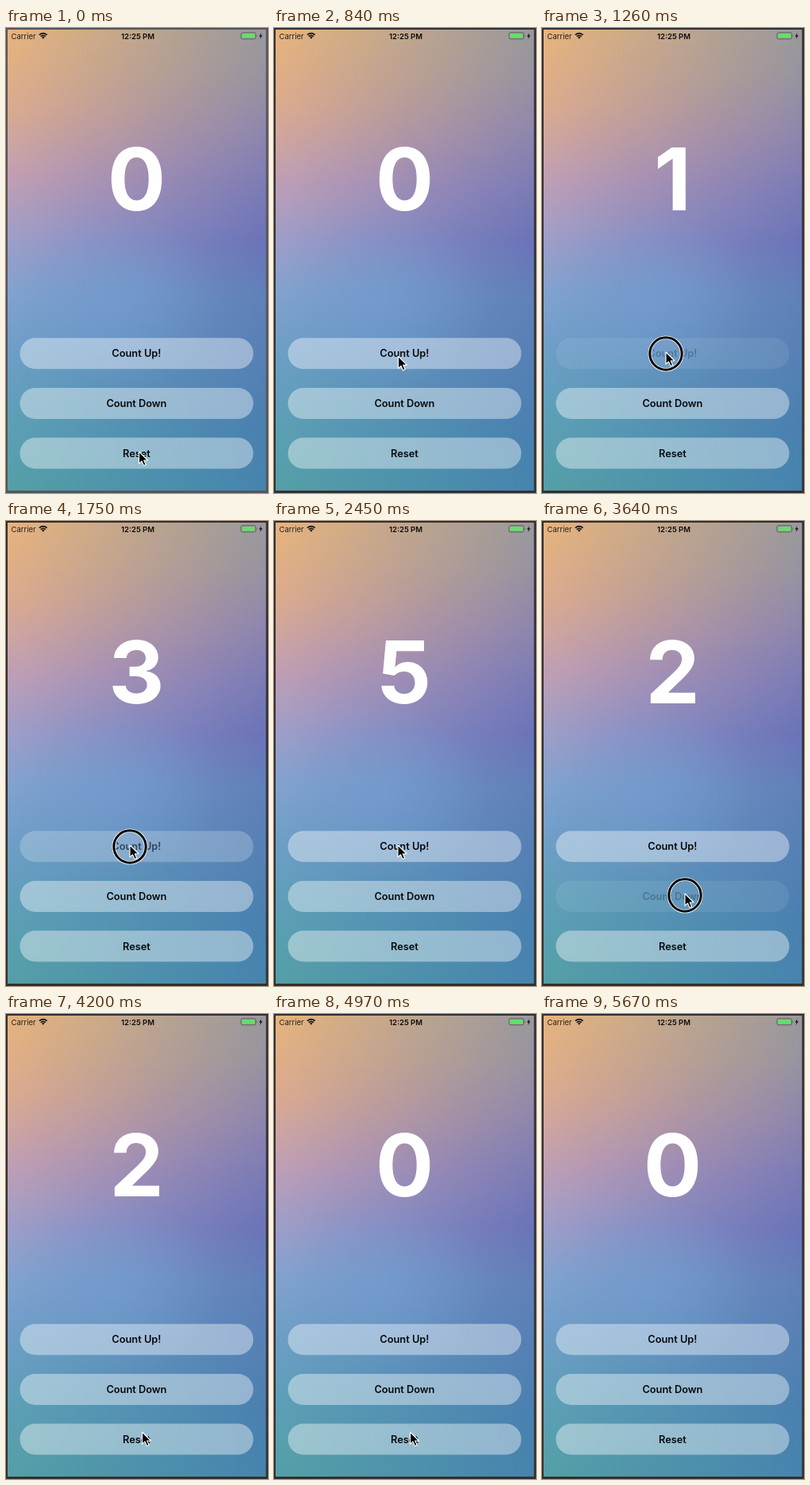
An HTML page that plays this animation: 330 px wide and 584 px high, repeating every 5.74 s.

```html
<!DOCTYPE html>
<html lang="en">
<head>
<meta charset="utf-8">
<title>Counter</title>
<style>
  html, body { margin: 0; width: 100%; height: 100%; overflow: hidden; background: #332f33; }
  #stage { position: relative; width: 330px; height: 584px; overflow: hidden; }
  #screen { position: absolute; left: 2px; top: 2px; width: 325.5px; height: 579px; }
  .layer { position: absolute; inset: 0; }
  .left {
    background: linear-gradient(#e8b47c, #dcab8f 17%, #c09fb5 33%, #a09fc8 45%,
      #82a3cf 57%, #6f9fc8 69%, #5fa0b8 83%, #54a0a6);
  }
  .right {
    background: linear-gradient(#99989c, #9693a0 10%, #8e86ad 22%, #7b7bb5 34%,
      #6a73b8 46%, #6080b8 58%, #5580b4 72%, #4a80b0 86%, #4684ae);
    -webkit-mask-image: linear-gradient(90deg, transparent, #000);
    mask-image: linear-gradient(90deg, transparent, #000);
  }
  .glow { background: radial-gradient(130px 110px at 42% 59%, rgba(116,162,212,.45), rgba(116,162,212,0)); }
  svg { position: absolute; left: 0; top: 0; }
  text { font-family: Inter, "Open Sans", sans-serif; }
  .button text { font-size: 12.8px; font-weight: 600; text-anchor: middle; fill: #080a0c; }
  .button rect { fill: #fff; fill-opacity: .4; }
  #count { font-size: 109px; font-weight: 700; text-anchor: middle; fill: #fff; }
  .status { font-size: 9.5px; fill: #25211f; }
</style>
</head>
<body>
<div id="stage">
  <div id="screen">
    <div class="layer left"></div>
    <div class="layer right"></div>
    <div class="layer glow"></div>
  </div>
  <svg width="330" height="584" viewBox="0 0 330 584">
    <text class="status" x="6.5" y="13.5">Carrier</text>
    <g fill="none" stroke="#151515" stroke-width="1.7">
      <path d="M41.9 8.7Q46.8 4.5 51.7 8.7M43.7 10.7Q46.8 8 49.9 10.7"/>
      <path d="M46.8 13.7L45 11.8Q46.8 10.3 48.6 11.8Z" fill="#151515" stroke="none"/>
    </g>
    <text class="status" x="166" y="13.5" text-anchor="middle" font-weight="600" style="fill:#0c0c0c">12:25 PM</text>
    <rect x="296" y="5.8" width="18.6" height="8" rx="2" fill="none" stroke="#4c5450" stroke-width=".8"/>
    <rect x="297.2" y="7" width="16.2" height="5.6" rx="1" fill="#67dc6c"/>
    <path d="M315.6 8.4q1.4 1.4 0 2.8z" fill="#4c5450"/>
    <path d="M321.8 6l-3.2 4.4h2l-.9 3.6 3.4-4.7h-2.1z" fill="#151515"/>
    <text id="count" x="164.5" y="229">0</text>
    <g id="buttons"></g>
    <g id="ring" fill="none">
      <circle r="20.2" stroke="#fff" stroke-width="4.6"/>
      <circle r="20.2" stroke="#000" stroke-width="3"/>
    </g>
    <path id="cursor" d="M0 0V15.2L3.5 12L6 17.6L8.7 16.4L6.2 11H11Z"
      fill="#000" stroke="#fff" stroke-width="1.1" stroke-linejoin="round"/>
    <path id="frame" fill-rule="evenodd" d="M0 0H330V584H0ZM2 2V581H327.5V2Z"/>
  </svg>
</div>
<script>
const LOOP = 5740, STEP = 70, FADE = 160, LINGER = 100, DIM = 0.2;
const $ = id => document.getElementById(id);

// press time, release time, button, count after release
const taps = [
  [1120, 1260, 0, 1], [1400, 1470, 0, 2], [1610, 1680, 0, 3],
  [1890, 1960, 0, 4], [2100, 2170, 0, 5],
  [2940, 3150, 1, 4], [3360, 3430, 1, 3], [3570, 3640, 1, 2],
  [4480, 4620, 2, 0]
];

// start time, end time, target x, y
const home = [167.5, 532];
const moves = [
  [350, 910, 156, 407],
  [2450, 2870, 180, 468],
  [3710, 4130, 171.5, 525],
  [5040, 5600, 245, 590]
];

const buttons = ["Count Up!", "Count Down", "Reset"].map((label, i) => {
  const y = 389.3 + i * 62.6;
  $("buttons").insertAdjacentHTML("beforeend",
    `<g class="button"><rect x="17.5" y="${y}" width="294" height="39" rx="19.5"/>
     <text x="164.4" y="${y + 24}">${label}</text></g>`);
  return $("buttons").lastElementChild;
});

const ease = p => p * p * (3 - 2 * p);

function cursorAt(t) {
  let [x, y] = home;
  for (const [from, to, tx, ty] of moves) {
    if (t < from) break;
    const p = ease(Math.min(1, (t - from) / (to - from)));
    x += (tx - x) * p;
    y += (ty - y) * p;
  }
  return [x, y];
}

function draw(t) {
  const alpha = [1, 1, 1];
  let count = 0, ring = false;
  for (const [down, up, button, value] of taps) {
    if (t < down) break;
    if (t >= up) count = value;
    if (t < up + LINGER) ring = true;
    alpha[button] = Math.min(1, DIM + (1 - DIM) * Math.max(0, t - up) / FADE);
  }
  buttons.forEach((b, i) => b.setAttribute("opacity", alpha[i]));
  $("count").textContent = count;
  const [x, y] = cursorAt(t);
  $("cursor").setAttribute("transform", `translate(${x} ${y})`);
  $("ring").setAttribute("transform", `translate(${x} ${y + 2})`);
  $("ring").style.display = ring ? "" : "none";
  $("frame").setAttribute("fill", t < STEP ? "#56545a" : "#332f33");
}

const start = performance.now();
function tick() {
  const t = (performance.now() - start) % LOOP;
  draw(Math.floor(t / STEP) * STEP);
  requestAnimationFrame(tick);
}
tick();
</script>
</body>
</html>
```
